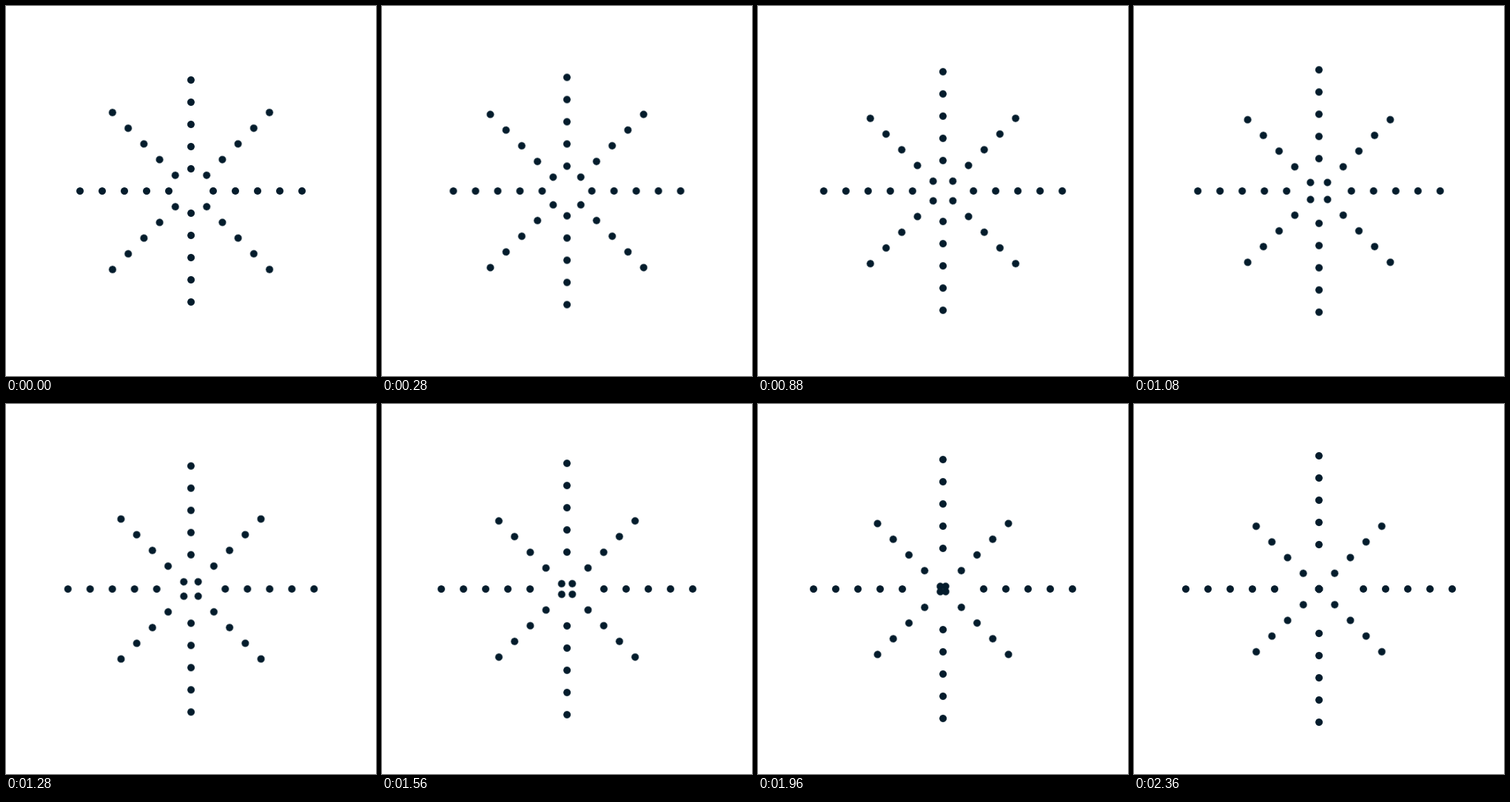
Animation of 500 by 500 pixels, one loop 2.4 s. Source, as an HTML page:

```html
<!DOCTYPE html>
<html lang="en">
<head>
<meta charset="utf-8">
<title>Radiating dots</title>
<style>
  html, body { margin: 0; width: 100%; height: 100%; overflow: hidden; background: #fff; }
  svg { display: block; width: 100%; height: 100%; fill: #041c2c; }
  .ray { animation: 2400ms steps(60, jump-none) infinite; }
  .out { animation-name: out; }
  .in { animation-name: in; }
  @keyframes out { from { transform: translateX(0); } to { transform: translateX(30px); } }
  @keyframes in { from { transform: translateX(0); } to { transform: translateX(-30px); } }
</style>
</head>
<body>
<svg viewBox="0 0 500 500">
  <defs>
    <g id="dots">
      <circle cx="30" r="5"/>
      <circle cx="60" r="5"/>
      <circle cx="90" r="5"/>
      <circle cx="120" r="5"/>
      <circle cx="150" r="5"/>
    </g>
  </defs>
  <g transform="translate(250 250)">
    <g transform="rotate(0)"><g class="ray out"><use href="#dots"/></g></g>
    <g transform="rotate(90)"><g class="ray out"><use href="#dots"/></g></g>
    <g transform="rotate(180)"><g class="ray out"><use href="#dots"/></g></g>
    <g transform="rotate(270)"><g class="ray out"><use href="#dots"/></g></g>
    <g transform="rotate(45)"><g class="ray in"><use href="#dots"/></g></g>
    <g transform="rotate(135)"><g class="ray in"><use href="#dots"/></g></g>
    <g transform="rotate(225)"><g class="ray in"><use href="#dots"/></g></g>
    <g transform="rotate(315)"><g class="ray in"><use href="#dots"/></g></g>
  </g>
</svg>
</body>
</html>
```
